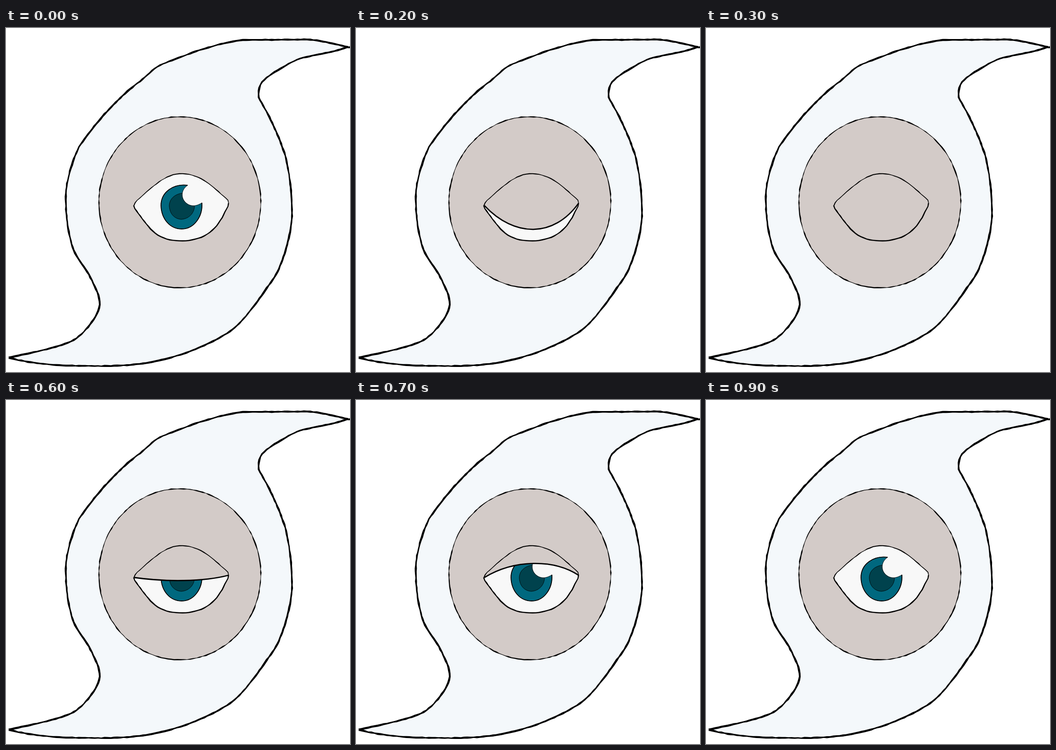
Recreate the animation shown at these times as an HTML page. Size 748 px wide and 748 px high, loop 1000 ms.

```html
<!DOCTYPE html>
<html lang="en">
<head>
<meta charset="utf-8">
<title>Blinking storm eye</title>
<style>
html, body { margin: 0; width: 100%; height: 100%; overflow: hidden; background: #fff; }
svg { display: block; width: 100vw; height: 100vh; }
</style>
</head>
<body>
<svg viewBox="0 0 748 748">
  <defs><clipPath id="socket"><path id="socketShape"/></clipPath></defs>
  <g id="storm"></g>
  <g id="eye" clip-path="url(#socket)"></g>
  <g id="rim"></g>
</svg>
<script>
const $ = id => document.getElementById(id);
const SKIN = '#d3cbc8';

let seed = 7;
const jitter = size => {
  seed = seed * 16807 % 2147483647;
  return (seed / 2147483647 * 2 - 1) * size;
};

function shape(parent, d, fill) {
  const el = document.createElementNS('http://www.w3.org/2000/svg', 'path');
  el.setAttribute('d', d);
  el.setAttribute('fill', fill);
  return $(parent).appendChild(el);
}

function line(parent, d, width) {
  const el = shape(parent, d, 'none');
  el.setAttribute('stroke', '#000');
  el.setAttribute('stroke-width', width);
  return el;
}

// Pen line along a path: a filled ribbon of uneven width
function pen(parent, d, width, uneven) {
  const path = shape(parent, d, '#000');
  const length = path.getTotalLength();
  const steps = Math.ceil(length / 7);
  const left = [], right = [];
  for (let i = 0; i <= steps; i++) {
    const s = length * i / steps;
    const p = path.getPointAtLength(s);
    const a = path.getPointAtLength(Math.max(0, s - 1));
    const b = path.getPointAtLength(Math.min(length, s + 1));
    const turn = Math.atan2(b.y - a.y, b.x - a.x);
    const half = (width + jitter(uneven)) / 2;
    const shift = jitter(.35);
    const side = r => [p.x - Math.sin(turn) * r, p.y + Math.cos(turn) * r].map(v => v.toFixed(2));
    left.push(side(shift + half));
    right.unshift(side(shift - half));
  }
  path.setAttribute('d', 'M' + left.concat(right).join('L') + 'Z');
}

const leftSide = 'M744 41C715 36 690 27 655 25L515 26C455 33 385 60 342 78' +
  'C318 88 310 102 290 117C245 150 195 205 159 258C144 290 129 335 130 372' +
  'C131 425 137 455 147 482C156 504 170 518 180 535C190 556 204 580 204 600' +
  'C203 620 180 655 150 677C113 697 50 706 6 717';
const rightSide = 'C60 731 110 735 200 735C300 736 375 720 460 676C482 664 500 652 512 637' +
  'C535 613 562 573 585 540C600 515 622 450 622 400C621 345 613 290 602 262' +
  'C588 222 569 185 550 153C547 125 556 117 568 107C592 90 620 74 640 66' +
  'C672 58 715 52 744 41L748 42';
const disc = 'M202 379A176 186 0 0 1 554 379A176 186 0 0 1 202 379';
const upper = 'M278 386C279 378 290 371 297 364C330 336 350 317 381 317' +
  'C425 317 448 345 476 368C481 372 485 376 484 381';
const lower = 'C484 390 479 394 476 400C458 440 430 463 380 463' +
  'C325 463 310 432 284 398C281 394 278 391 278 386';
const socket = upper + lower + 'Z';

shape('storm', leftSide + rightSide, '#f4f8fb');
pen('storm', leftSide, 3.8, 1);
pen('storm', 'M6 717' + rightSide, 3.8, 1);
shape('storm', disc, SKIN);
pen('storm', disc, 2, 1.1);

const outer = 'M395 342C365 338 337 356 337 386C338 416 357 437 382 437C409 437 428 410 426 380';
const bite = 'C413 389 400 388 391 380C380 370 380 352 395 342';
const pupil = 'M383 359C365 362 355 373 355 387C356 404 366 415 381 416C398 415 409 403 410 387';
$('socketShape').setAttribute('d', socket);
shape('eye', socket, '#f8f8f8');
const iris = [
  shape('eye', outer + bite + 'Z', '#00687f'),
  shape('eye', pupil + 'C401 388 382 379 383 359Z', '#00424d'),
  line('eye', outer, 1.8),
  line('eye', outer + bite, .9),
  line('eye', pupil, .9)
];
const lidFill = shape('eye', '', SKIN);
const lidLine = line('rim', '', 2.8);
pen('rim', upper, 1.8, .5);
pen('rim', 'M484 381' + lower, 2.6, .5);

// Lid drop per tenth of a second: 0 is just below the top rim, 1 nearly shut
const OPEN = -1, SHUT = 2;
const drops = [OPEN, .45, 1, SHUT, SHUT, 1, .45, 0, -.25, OPEN];

function draw(ms) {
  const drop = drops[Math.floor(ms % 1000 / 100)];
  const moving = drop !== OPEN && drop !== SHUT;
  const y = 346 + 110 * drop;
  const lid = moving ? `M279 386C345 ${y} 430 ${y} 484 381` : '';
  lidLine.setAttribute('d', lid);
  lidFill.setAttribute('d', moving ? lid + 'L490 300H270Z' : drop === SHUT ? socket : '');
  for (const part of iris) part.style.display = drop < 1 ? '' : 'none';
}

let start;
function tick(now) {
  start ??= now;
  draw(now - start);
  requestAnimationFrame(tick);
}
draw(0);
requestAnimationFrame(tick);
</script>
</body>
</html>
```
